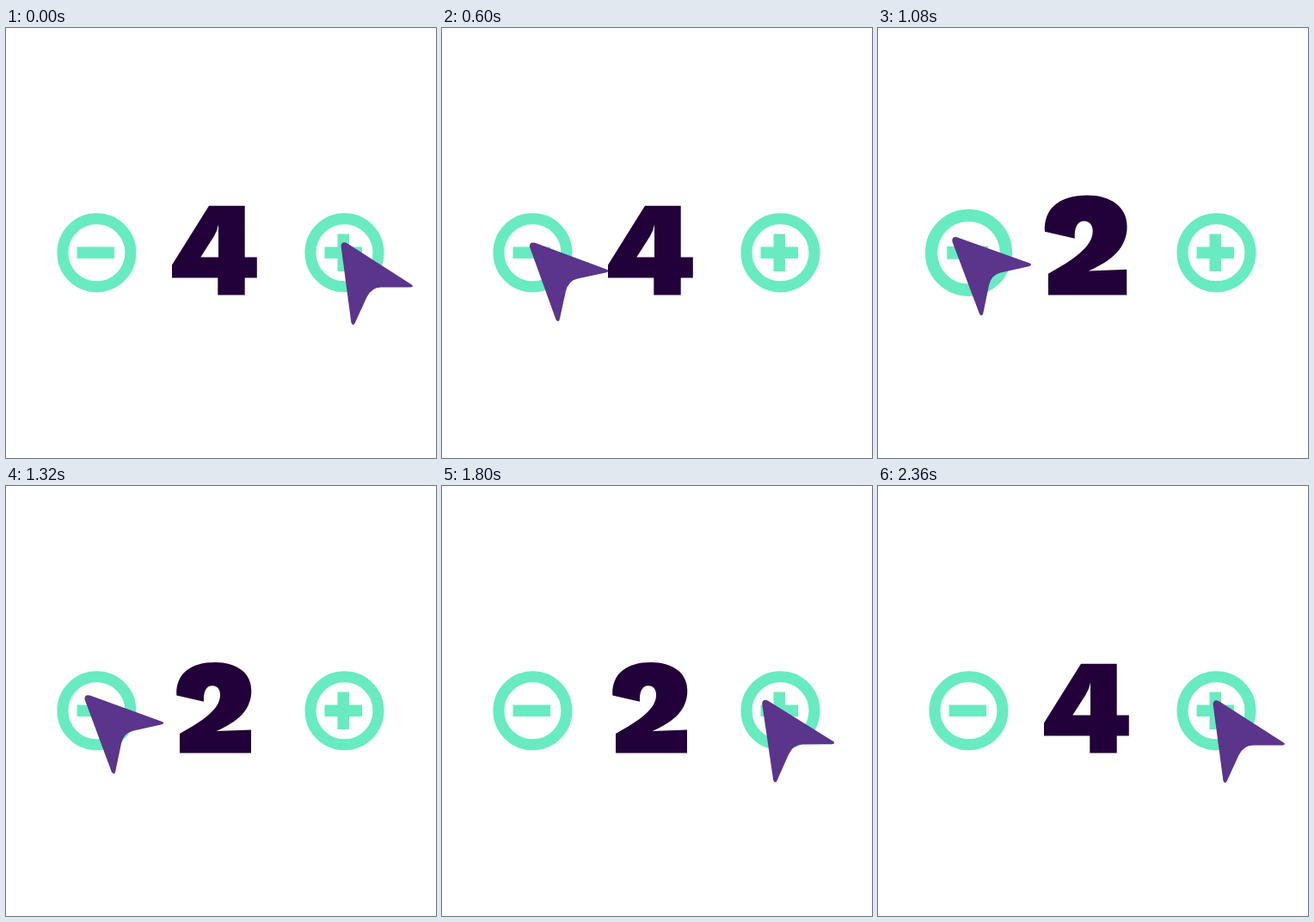
An HTML page that plays this animation: 500 by 500 pixels, repeating every 2440 ms.

```html
<!DOCTYPE html>
<html lang="en">
<head>
<meta charset="utf-8">
<title>Counter</title>
<style>
  html, body { margin: 0; width: 100%; height: 100%; overflow: hidden; background: #fff; }
  svg { display: block; width: 100%; height: 100%; }
  .ring { fill: none; stroke: #68ebc0; stroke-width: 13; }
  .sign { fill: #68ebc0; }
  #digit { fill: #220039; fill-rule: evenodd; }
  #cursor { fill: #5b348b; }
</style>
</head>
<body>
<svg viewBox="0 0 500 500">
  <defs>
    <path id="out" d="M393 252.5C303 254 93.5 264 89.5 246.5"/>
    <path id="back" d="M89.5 246.5L393 252.5"/>
  </defs>
  <g id="minus">
    <circle class="ring" cx="105.4" cy="261.3" r="39.5"/>
    <path class="sign" d="M82.5 254.5h43.5v13.5h-43.5z"/>
  </g>
  <g id="plus">
    <circle class="ring" cx="393.5" cy="261.3" r="39.5"/>
    <path class="sign" d="M370.5 254.5H385.5V239.5H399V254.5H414V268H399V283H385.5V268H370.5Z"/>
  </g>
  <path id="digit"/>
  <path id="cursor" d="M-3.4 1.5L8.4 90Q9.2 92.5 10.6 92.5Q12 92.5 13 90L26.5 60.5Q32 49 43 48.9L77.5 49.1Q79.8 48.8 79.9 47.5Q79.9 46.3 78 45.4L3.5 -2.3Q0 -4.2 -2 -2.6Q-3.7 -1.2 -3.4 1.5Z"/>
</svg>
<script>
const LOOP = 2440, STEP = 40, MOVE = 800, PULSE = 160, TILT = -13;

const glyphs = {
  2: 'M198.3 243.5L230 250.8C229.3 238 233.5 232.3 239.8 232.3C246 232.3 249.2 236.8 249 243.5' +
     'C248.6 260 228 273.5 202 288V310.5H285V283.5L244.5 285C270 274 285.3 260 285.3 238' +
     'C285.3 217 268 205 243 205C215 205 197 218 198.3 243.5Z',
  3: 'M199 236C201 215 220 205 243 205C268 205 285 215 285 232C285 245 277 252 266 255.5' +
     'C280 258 288 267 288 280C288 301 269 312.2 242 312.2C215 312.2 198 301 196.8 279L229.5 275' +
     'C230.5 284 235 288.5 242 288.5C249.5 288.5 254 284 254 277.5C254 270 249 267.5 240 267.5' +
     'H231V246H240C248 246 252.5 243 252.5 237C252.5 231 248.5 227.8 242 227.8C236 227.8 232 231.5 231 239Z',
  4: 'M236 206.7H277.7V266.5H291.8V290.5H277.7V310.5H246.3V290.5H193V275.5Z' +
     'M247 266.5V228.5Q246 235.5 242 242L226.3 266.5Z'
};

const [minus, plus, digit, cursor, out, back] =
  ['minus', 'plus', 'digit', 'cursor', 'out', 'back'].map(id => document.getElementById(id));

// Cubic Bezier timing (.73, 0, .27, 1), solved by bisection
function ease(x) {
  if (x <= 0 || x >= 1) return Math.min(1, Math.max(0, x));
  let lo = 0, hi = 1, u;
  for (let i = 0; i < 24; i++) {
    u = (lo + hi) / 2;
    const v = 1 - u;
    if (2.19 * u * v * v + 0.81 * u * u * v + u ** 3 < x) lo = u; else hi = u;
  }
  return u * u * (3 - 2 * u);
}

// Two consecutive clicks, each a linear swell to 110% and back
function pulse(t) {
  if (t < 0 || t >= 2 * PULSE) return 1;
  return 1.1 - 0.1 * Math.abs(t % PULSE / (PULSE / 2) - 1);
}

// Number of clicks that have reached their peak
const clicks = t => Math.max(0, Math.min(2, Math.floor((t + PULSE / 2) / PULSE)));

function scale(el, s, x, y) {
  el.setAttribute('transform', `translate(${x} ${y}) scale(${s}) translate(${-x} ${-y})`);
}

function draw(t) {
  const down = t - 840, up = t - 2040;
  const minusScale = pulse(down), plusScale = pulse(up);
  scale(minus, minusScale, 105.4, 261.3);
  scale(plus, plusScale, 393.5, 261.3);
  scale(digit, Math.max(minusScale, plusScale), 242.3, 310.5);
  digit.setAttribute('d', glyphs[4 - clicks(down) + clicks(up)]);

  const returning = t >= 1200;
  const route = returning ? back : out;
  const p = ease((returning ? t - 1200 : t) / MOVE);
  const { x, y } = route.getPointAtLength(p * route.getTotalLength());
  cursor.setAttribute('transform', `translate(${x} ${y}) rotate(${TILT * (returning ? 1 - p : p)})`);
}

const start = performance.now();
function tick() {
  const t = (performance.now() - start) % LOOP;
  draw(Math.floor(t / STEP) * STEP);
  requestAnimationFrame(tick);
}
tick();
</script>
</body>
</html>
```
